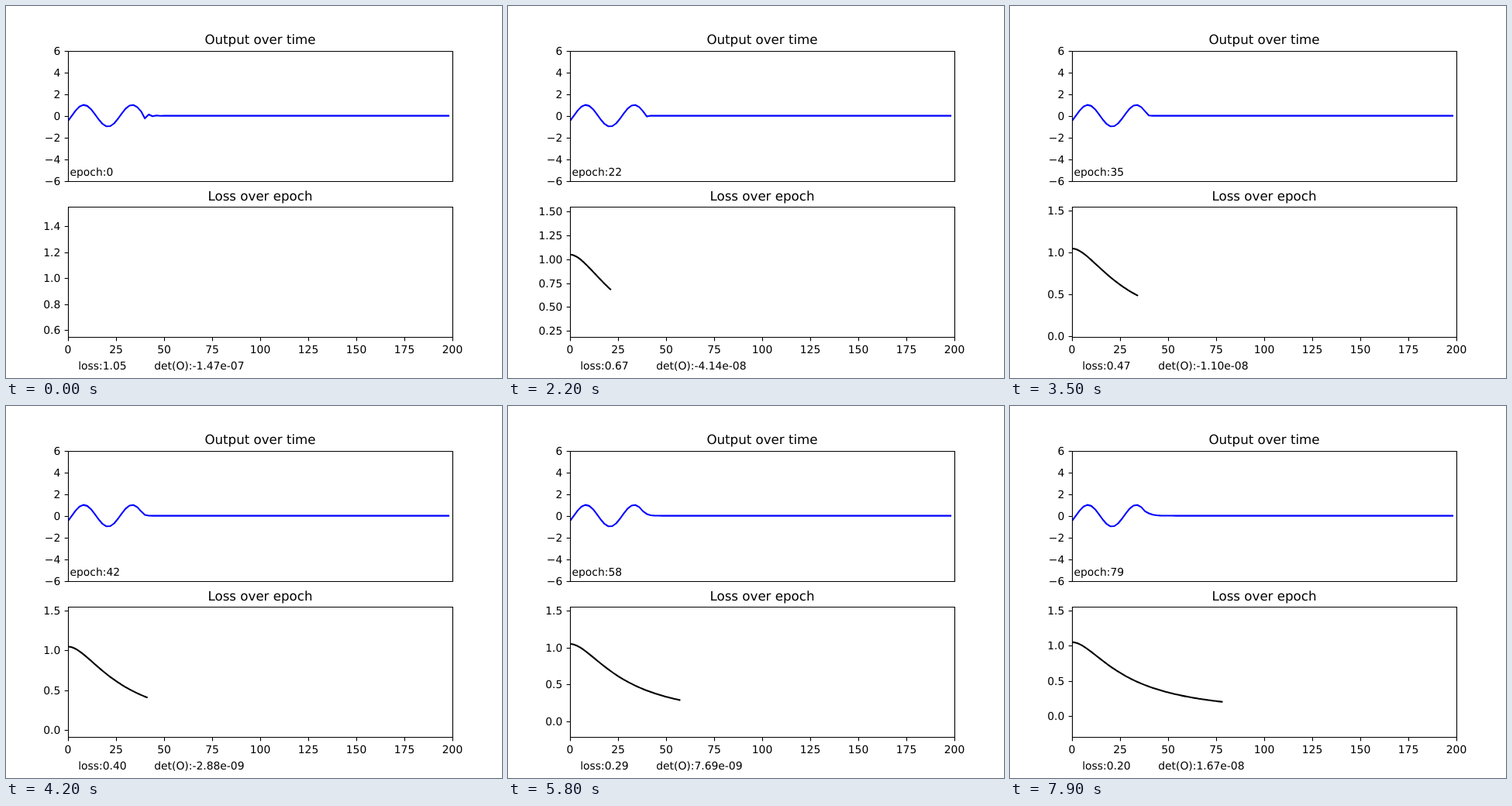
Animation, 640 px wide and 480 px high, one loop 8 s. Source, as an HTML page:

```html
<!DOCTYPE html>
<html lang="en">
<head>
<meta charset="utf-8">
<title>Training progress</title>
<style>
  html, body { margin: 0; width: 100%; height: 100%; overflow: hidden; background: #fff; }
  svg { display: block; width: 640px; height: 480px; }
  text { font: 13.889px "DejaVu Sans", sans-serif; fill: #000; text-rendering: geometricPrecision; }
  .title { font-size: 16.667px; text-anchor: middle; }
  .curve { fill: none; stroke-width: 2.083; stroke-linejoin: round; stroke-linecap: square; }
  .axis { fill: none; stroke: #000; stroke-width: 1.11; }
</style>
</head>
<body>
<svg id="stage" viewBox="0 0 640 480" xmlns="http://www.w3.org/2000/svg">
  <clipPath id="upper"><rect x="80" y="57.6" width="496" height="168"/></clipPath>
  <clipPath id="lower"><rect x="80" y="259.2" width="496" height="168"/></clipPath>
  <path id="output" class="curve" stroke="#00f" clip-path="url(#upper)"/>
  <path id="loss" class="curve" stroke="#000" clip-path="url(#lower)"/>
  <path class="axis" d="M80.5 58.5H576.5V226.5H80.5ZM80.5 259.5H576.5V427.5H80.5Z"/>
  <g id="fixedTicks"></g>
  <g id="lossTicks"></g>
  <text class="title" x="328" y="49">Output over time</text>
  <text class="title" x="328" y="251">Loss over epoch</text>
  <text id="epochText" x="82.5" y="219"></text>
  <text id="lossText" x="93.2" y="469"></text>
  <text id="detText" x="191.2" y="469"></text>
</svg>
<script>
const STEP_MS = 100, EPOCHS = 80;
const LEFT = 80, UNIT_X = 2.48, HEIGHT = 168, LOSS_BOTTOM = 427.2;
const $ = id => document.getElementById(id);
const toX = v => LEFT + v * UNIT_X;
const outputY = v => 141.6 - 14 * v;
const minus = s => s.replace("-", "\u2212");

const polyline = points =>
  points.length > 1 ? "M" + points.map(p => p.map(v => v.toFixed(3)).join(" ")).join("L") : "";

const xTick = v => {
  const x = Math.round(toX(v)) + 0.5;
  return `<path class="axis" d="M${x} 427.5v4.86"/>` +
    `<text x="${toX(v)}" y="448" text-anchor="middle">${v}</text>`;
};

const yTick = (y, label) =>
  `<path class="axis" d="M80.5 ${Math.round(y) + 0.5}h-4.86"/>` +
  `<text x="70.3" y="${Math.round(y + 5)}" text-anchor="end">${minus(label)}</text>`;

// Smooth curve through [x, y] knots with averaged tangents.
function spline(knots, x) {
  const slope = i => (knots[i + 1][1] - knots[i][1]) / (knots[i + 1][0] - knots[i][0]);
  const last = knots.length - 1;
  const tangent = i =>
    i === 0 ? slope(0) : i === last ? slope(last - 1) : (slope(i - 1) + slope(i)) / 2;
  let i = 0;
  while (i < last - 1 && x > knots[i + 1][0]) i++;
  const [x0, y0] = knots[i], [x1, y1] = knots[i + 1];
  const w = x1 - x0, s = (x - x0) / w, r = 1 - s;
  return y0 * (1 + 2 * s) * r * r + tangent(i) * w * s * r * r +
    y1 * s * s * (3 - 2 * s) - tangent(i + 1) * w * s * s * r;
}

const DET = [[0, -147], [11, -95.3], [22, -41.4], [35, -11], [45, -0.3], [49, 2.7], [67, 11.9], [79, 16.7]];
const TAIL_START = [[0, -0.25], [11, -0.18], [22, -0.07], [35, 0.03], [49, 0.11], [67, 0.19], [79, 0.22]];
const TAIL_RATIO = [[0, -0.45], [11, -0.33], [22, -0.15], [35, 0], [49, 0.2], [67, 0.36], [79, 0.42]];

function lossAt(epoch) {
  const u = Math.log(epoch / 10);
  return 1.048 / (1 + 0.15 * Math.exp(u * (1.75 - 0.064 * u)));
}

function scientific(v) {
  return v.toExponential(2).replace(/e([+-])(\d)$/, "e$10$2");
}

function outputPath(epoch) {
  const start = spline(TAIL_START, epoch), ratio = spline(TAIL_RATIO, epoch);
  return polyline(Array.from({ length: 100 }, (_, i) => {
    const v = i < 20 ? Math.sin((i - 1) / 2) : start * ratio ** (i - 20);
    return [toX(2 * i), outputY(v)];
  }));
}

function drawLoss(epoch) {
  const low = lossAt(Math.max(epoch - 1, 0)) - 0.5, high = lossAt(0) + 0.5;
  const range = high - low;
  const toY = v => LOSS_BOTTOM - (v - low) / range * HEIGHT;
  $("loss").setAttribute("d", polyline(
    Array.from({ length: epoch }, (_, i) => [toX(i), toY(lossAt(i))])));

  const step = [0.2, 0.25, 0.5].find(s => s >= range / 6);
  let ticks = "";
  for (let n = Math.ceil(low / step); n * step <= high; n++) {
    ticks += yTick(toY(n * step), Math.abs(n * step).toFixed(step === 0.25 ? 2 : 1));
  }
  $("lossTicks").innerHTML = ticks;
}

function draw(epoch) {
  $("output").setAttribute("d", outputPath(epoch));
  drawLoss(epoch);
  $("epochText").textContent = "epoch:" + epoch;
  $("lossText").textContent = "loss:" + lossAt(epoch).toFixed(2);
  $("detText").textContent = "det(O):" + scientific(spline(DET, epoch) * 1e-9);
}

$("fixedTicks").innerHTML =
  [0, 25, 50, 75, 100, 125, 150, 175, 200].map(xTick).join("") +
  [-6, -4, -2, 0, 2, 4, 6].map(v => yTick(outputY(v), String(v))).join("");

let shown = -1;
const began = performance.now();
function frame() {
  const epoch = Math.floor((performance.now() - began) / STEP_MS) % EPOCHS;
  if (epoch !== shown) draw(shown = epoch);
  requestAnimationFrame(frame);
}
frame();
</script>
</body>
</html>
```
